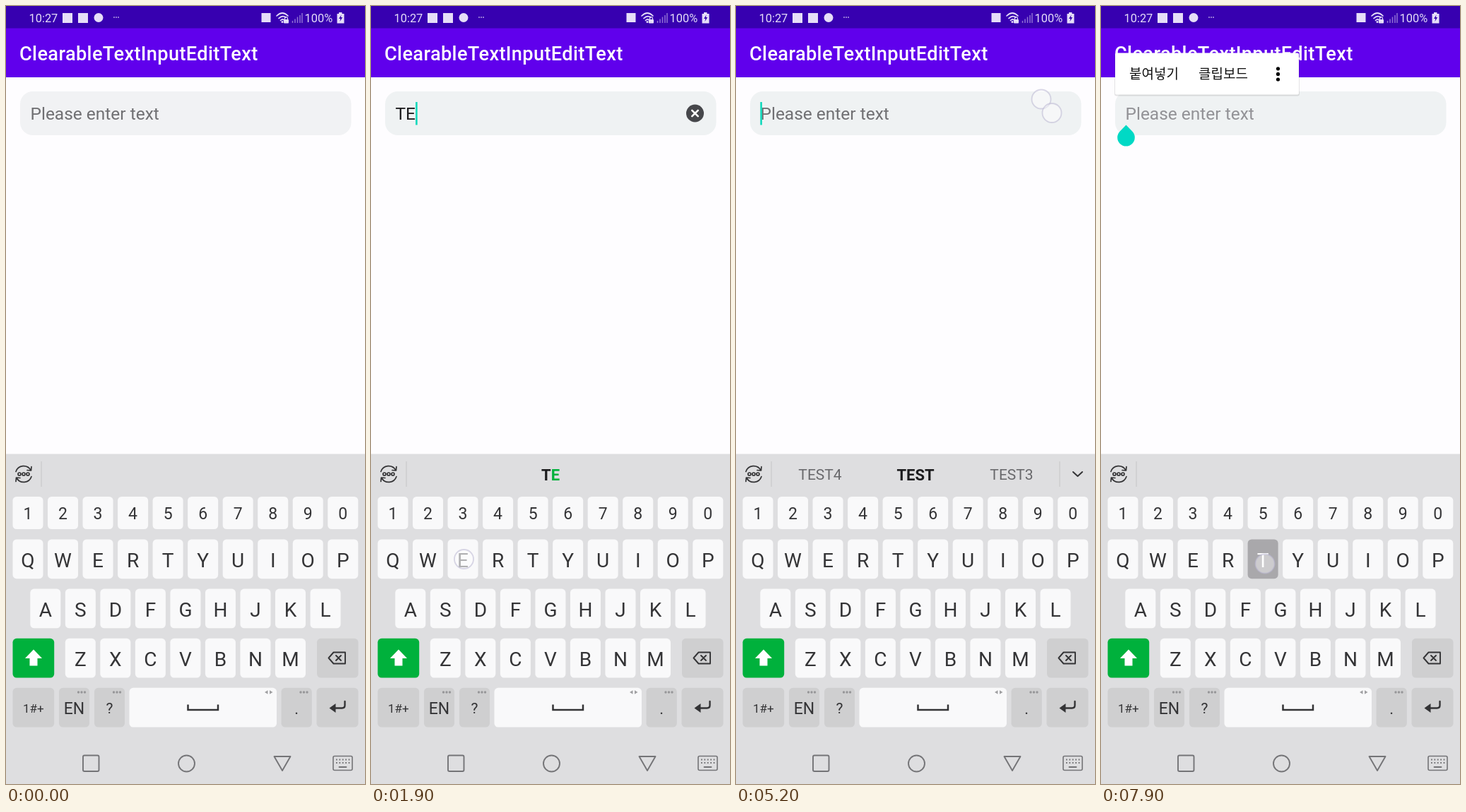
Animation of 508 by 1102 pixels, one loop 8 s. Source, as an HTML page:

```html
<!DOCTYPE html>
<html lang="en">
<head>
<meta charset="utf-8">
<title>ClearableTextInputEditText</title>
<style>
html, body { margin: 0; width: 100%; height: 100%; overflow: hidden; background: #fefdff; }
svg { display: block; width: 100%; height: 100%; font-family: Roboto, sans-serif; }
.mid { text-anchor: middle; }
.line { fill: none; stroke-linecap: round; stroke-linejoin: round; }
.ink { fill: #343436; }
</style>
</head>
<body>
<svg viewBox="0 0 508 1102" xmlns="http://www.w3.org/2000/svg">
  <rect width="508" height="1102" fill="#fefdff"/>
  <rect width="508" height="101" fill="#6000ec"/>
  <rect width="508" height="31.5" fill="#3700b0"/>

  <!-- status bar -->
  <g fill="#e6def8" font-size="16.4">
    <text x="32.5" y="23">10:27</text>
    <rect x="80" y="10" width="14" height="14"/>
    <rect x="102" y="10" width="14" height="14"/>
    <circle cx="131" cy="16.5" r="6.5"/>
    <g opacity=".7"><circle cx="153" cy="16" r="1"/><circle cx="156" cy="16" r="1"/><circle cx="159" cy="16" r="1"/></g>
    <rect x="361.500" y="10" width="13" height="13"/>
    <g class="line" stroke="#e6def8" stroke-width="1.7">
      <path d="M383 14Q391 6 399 14M386 17.500Q391 12.500 396 16M388.500 20.500Q391 18 393 19.500"/>
      <path d="M394.500 19v-1.500a2 2 0 0 1 4 0V19" stroke-width="1.200"/>
    </g>
    <circle cx="391" cy="22.500" r="1.500"/>
    <rect x="393" y="19" width="7" height="5.500" rx="1"/>
    <path d="M405.500 24v-3M409 24v-5.500M412.500 24v-8.500M416 24v-11M419 24v-14" stroke="#e6def8" stroke-width="1.500" opacity=".5"/>
    <text x="422.500" y="23">100%</text>
    <path d="M471 9h4.500v2h3v13.500h-10V11H471z"/>
    <path d="M474.500 12.500l-3.500 5.500h2.200l-.7 4 3.700-6h-2.300z" fill="#3700b0"/>
  </g>
  <text x="19" y="77" font-size="27.2" font-weight="500" letter-spacing=".34" fill="#fff">ClearableTextInputEditText</text>

  <!-- text field -->
  <rect id="field" x="20" y="121" width="468.500" height="62" rx="18"/>
  <text id="value" x="34.500" y="161" font-size="24.470"></text>
  <rect id="cursor" y="136" width="2.600" height="32.500" fill="#10d9bb"/>
  <g id="clear">
    <circle cx="458.500" cy="152" r="12.500" fill="#46474b"/>
    <path class="line" d="M454.300 147.800l8.400 8.400M462.700 147.800l-8.400 8.400" stroke="#fff" stroke-width="2.600"/>
  </g>
  <path id="handle" d="M35.500 168.500L44.200 177.500A12.300 12.300 0 1 1 26.800 177.500Z" fill="#00d9c5"/>
  <g id="popup">
    <rect x="19" y="67.500" width="262" height="60" rx="3" fill="#000" opacity=".1"/>
    <rect x="20" y="66.500" width="260" height="59" rx="2" fill="#fff"/>
    <g font-family="'Noto Sans CJK KR', 'Noto Sans CJK', sans-serif" font-size="19" fill="#111">
      <text x="40" y="103">붙여넣기</text>
      <text x="138" y="103">클립보드</text>
    </g>
    <circle cx="250.500" cy="88.800" r="2.600"/><circle cx="250.500" cy="96.400" r="2.600"/><circle cx="250.500" cy="104" r="2.600"/>
  </g>

  <!-- keyboard -->
  <rect y="634.500" width="508" height="468" fill="#dedee0"/>
  <g class="line" stroke="#343436" stroke-width="1.700">
    <path d="M14 659.500A11.500 11.500 0 0 1 35 657.500M36 652.500l-.5 5.500-5.500-.5M36 666.500A11.500 11.500 0 0 1 15 668.500M14 673.500l.5-5.500 5.500.5"/>
    <circle cx="19" cy="663" r="2"/><circle cx="25" cy="663" r="2"/><circle cx="31" cy="663" r="2"/>
  </g>
  <path d="M50 645v36" stroke="#cbcbcd" stroke-width="1.300"/>
  <text id="word" class="mid" x="254" y="671.500" font-size="22" font-weight="700" fill="#1c1c1e"><tspan id="done"></tspan><tspan id="last"></tspan></text>
  <g id="extra">
    <g class="mid" font-size="21" fill="#68686b"><text x="119" y="671">TEST4</text><text x="390" y="671">TEST3</text></g>
    <path d="M458 645v36" stroke="#cbcbcd" stroke-width="1.300"/>
    <path class="line" d="M477 660l6.500 6 6.500-6" stroke="#343436" stroke-width="2"/>
  </g>
  <g id="keys" class="mid"></g>
  <path d="M39 911.500L51 924H44.500V934.500H33.500V924H27Z" fill="#fff"/>
  <g class="line" stroke="#343436" stroke-width="1.900">
    <path d="M463.500 915.500H480V931.500H463.500L456.500 923.500ZM467 920l7 7M474 920l-7 7"/>
    <path d="M257.500 989.500V997H300V989.500" stroke-width="2.500" style="stroke-linecap:butt;stroke-linejoin:miter"/>
    <path d="M479.500 985v5.500q0 4-4 4H464" stroke-width="2.400"/>
  </g>
  <path d="M457.500 994.500l9-6.500v13z" class="ink"/>
  <g id="dots" fill="#969698"></g>
  <path d="M366 972l4.500-2.800v5.600zM377.500 972l-4.500-2.800v5.600z" fill="#a0a0a2"/>

  <!-- navigation bar -->
  <g class="line" stroke="#747477" stroke-width="1.900">
    <rect x="109" y="1061.500" width="22.500" height="22.500" rx="2"/>
    <circle cx="255.500" cy="1073" r="11.500"/>
    <path d="M379.500 1063H402.500L391 1083Z"/>
    <rect x="463" y="1062.500" width="27" height="20" rx="2" stroke-width="1.600"/>
    <path d="M467 1067.500h19.500M467 1072h19.500" stroke-dasharray="1.800 2.600" style="stroke-linecap:butt" stroke-width="2.200"/>
    <path d="M471.500 1078h10" stroke-width="1.800"/>
  </g>
  <g id="touches"></g>
</svg>
<script>
const LOOP = 8000, STEP = 100;
const $ = id => document.getElementById(id);

function add(parent, tag, attrs, text) {
  const el = document.createElementNS('http://www.w3.org/2000/svg', tag);
  for (const k in attrs) el.setAttribute(k, attrs[k]);
  if (text) el.textContent = text;
  return parent.appendChild(el);
}

const keys = {};
function key(label, x, y, w, h, size, fill = '#f9f9fa') {
  const box = add($('keys'), 'rect', { x, y, width: w, height: h, rx: 5.5, fill });
  const text = add($('keys'), 'text', {
    x: x + w / 2, y: y + h / 2 + size * 0.355 + 1.3, 'font-size': size, fill: '#343436'
  }, label);
  keys[label] = { box, text };
}
const row = (chars, x, y, h, size) =>
  [...chars].forEach((c, i) => key(c, x + i * 49.53, y, 43, h, size));

row('1234567890', 9.5, 695, 46, 23);
row('QWERTYUIOP', 9.5, 755.5, 55.7, 28);
row('ASDFGHJKL', 34.3, 825.6, 55.7, 28);
row('ZXCVBNM', 83.8, 895.8, 55.7, 28);
const GREY = '#cfcfd0';
key('', 9.5, 895.8, 58.7, 55.7, 1, '#00b13c');
key('', 440, 895.8, 58.5, 55.7, 1, GREY);
key('1#+', 9.5, 965.8, 58.7, 55.7, 17, GREY);
key('EN', 75, 965.8, 43, 55.7, 23, GREY);
key('?', 125, 965.8, 43, 55.7, 21, GREY);
key('', 174.5, 965.8, 208.5, 55.7, 1);
key('.', 389.5, 965.8, 43.3, 55.7, 22, GREY);
key('', 439.5, 965.8, 59, 55.7, 1, GREY);

for (const x of [107, 157, 421.5])
  for (const d of [-4.5, 0, 4.5]) add($('dots'), 'circle', { cx: x + d, cy: 972, r: 1.7 });

// Taps: key, position, down, up, opacity just after release
const taps = [
  ['T', 246, 798, 1300, 1400, 0.75],
  ['E', 131.5, 783.5, 1800, 1900, 1],
  ['S', 107, 853, 2200, 2300, 1],
  ['T', 235, 781, 2600, 2700, 1],
  ['', 432, 132, 5100, 5300, 1],
  ['', 447, 151.5, 5200, 5300, 1],
  ['T', 232, 790, 7900, 8000, 1]
].map(([name, x, y, down, up, glow]) => ({
  name, down, up, glow,
  dot: add($('touches'), 'circle', {
    cx: x, cy: y, r: 13.5, fill: '#fff', 'fill-opacity': 0.42,
    stroke: '#b9b6d2', 'stroke-opacity': 0.55, 'stroke-width': 1.8
  })
}));

const typed = [1400, 1900, 2300, 2700];
const CLEARED = 5200;
const blinks = [100, 600, 1100, 3200, 3700, 4200, 4700, 5700, 6200, 6800, 7300, 7700];

const show = (id, opacity) => $(id).setAttribute('opacity', +opacity);
const clamp = v => Math.max(0, Math.min(1, v));

function draw(t) {
  const count = typed.filter(at => t >= at).length;
  const text = t < CLEARED ? 'TEST'.slice(0, count) : '';
  const value = $('value');
  value.textContent = text || 'Please enter text';
  value.setAttribute('fill', text ? '#1d1d1f' : t < 5300 ? '#707073' : '#929296');
  $('field').setAttribute('fill', t < 1800 ? '#f1f2f4' : '#eff2f3');

  $('cursor').setAttribute('x', 34.3 + 14.4 * text.length);
  // The cursor goes on at every second blink, counted around edits
  const n = blinks.filter(at => t >= at).length;
  show('cursor', t >= CLEARED ? n % 2 : n % 2);
  show('clear', text !== '');

  const word = t < 5300 ? 'TEST'.slice(0, count) : '';
  const settled = t >= 2800;
  $('done').textContent = word.slice(0, -1);
  $('last').textContent = word.slice(-1);
  $('last').setAttribute('fill', settled ? '#1c1c1e' : '#00b13c');
  show('extra', settled && t < 5300);
  show('handle', t >= 5300);
  show('popup', clamp((t - 5200) / 200));

  for (const k of 'TES') {
    keys[k].box.setAttribute('fill', '#f9f9fa');
    keys[k].text.setAttribute('fill', '#343436');
  }
  for (const { name, down, up, glow, dot } of taps) {
    const held = t >= down && t < up;
    const fade = t < up ? 1 : glow * clamp(1 - (t - up) / 200);
    dot.setAttribute('opacity', t < down ? 0 : fade);
    if (!name) continue;
    if (held) {
      keys[name].box.setAttribute('fill', '#a9a8ab');
      keys[name].text.setAttribute('fill', '#fff');
    } else if (glow === 1 && t >= up && t < up + STEP) {
      keys[name].text.setAttribute('fill', '#77777a');
    }
  }
}

const start = performance.now();
function tick() {
  const t = (performance.now() - start) % LOOP;
  draw(Math.floor(t / STEP) * STEP);
  requestAnimationFrame(tick);
}
tick();
</script>
</body>
</html>
```
